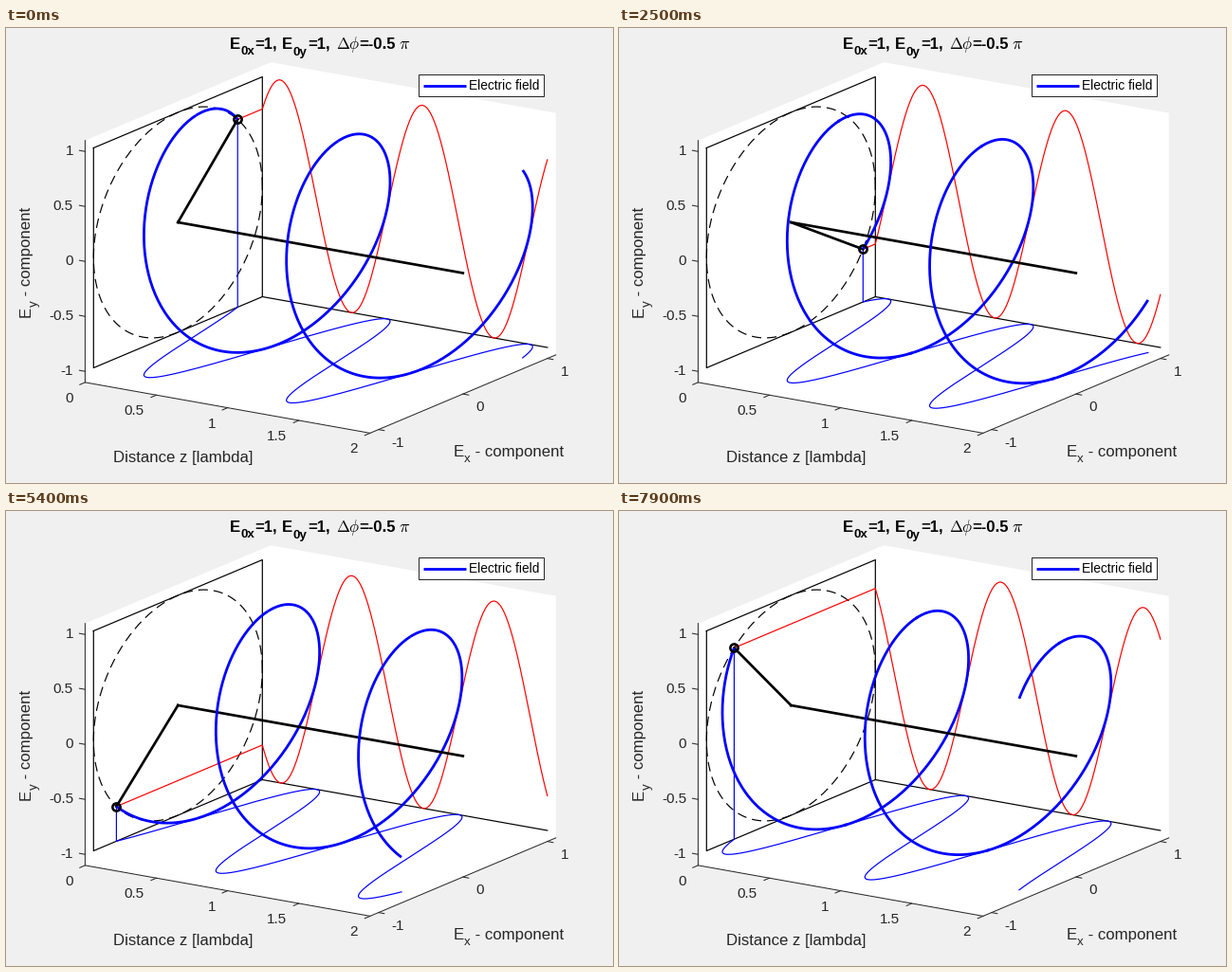
Write a matplotlib script that moves like this. It is 640 by 480 pixels and loops after 8000 ms.

```python
import numpy as np
import matplotlib.pyplot as plt
from matplotlib.animation import FuncAnimation
from matplotlib.patches import Polygon, Rectangle

W, H, DPI = 640, 480, 100
FRAMES, INTERVAL, HOLD = 80, 100, 4
PX = 72 / DPI                      # points per pixel
GREY = "#262626"
TICK, LABEL, SUB, SMALL = 15.3, 16.8, 13.4, 13.8
LIM = 1.1

plt.rcParams["font.family"] = "Liberation Sans"
plt.rcParams["mathtext.fontset"] = "cm"

fig = plt.figure(figsize=(W / DPI, H / DPI), dpi=DPI, facecolor="#f0f0f0")
ax = fig.add_axes([0, 0, 1, 1])
ax.set_xlim(0, W)
ax.set_ylim(H, 0)
ax.axis("off")


def project(x, y, z):
    """Parallel projection of field components x, y at distance z."""
    x, y, z = np.broadcast_arrays(*(np.asarray(v, float) for v in (x, y, z)))
    return (181.3 + 150.25 * z + 89 * x,
            205 + 26.75 * z - 37.5 * x - 116 * y)


def line(x, y, z, color, width, order, **kw):
    return ax.plot(*project(x, y, z), color=color, lw=width * PX,
                   zorder=order, **kw)[0]


def label(x, y, s, size=TICK, color=GREY, **kw):
    ax.text(x, y, s, size=size * PX, color=color, va="baseline",
            rotation_mode="anchor", zorder=21, **kw)


def tick(x, y, z, dx, dy):
    px, py = project(x, y, z)
    ax.plot([px, px + dx], [py, py + dy], color=GREY, lw=PX, zorder=2)


def draw_box():
    a = LIM
    outline = project([-a, a, a, a, -a, -a], [a, a, a, -a, -a, -a],
                      [0, 0, 2, 2, 2, 0])
    ax.add_patch(Polygon(np.column_stack(outline), fc="white", ec="none",
                         zorder=1))
    line([-a, -a, -a, a], [a, -a, -a, -a], [0, 0, 2, 2], GREY, 1, 2)

    for i, v in enumerate([1, 0.5, 0, -0.5, -1]):
        tick(-a, v, 0, -6, -1.1)
        label(71, 133.7 + 58.1 * i, f"{v:g}", ha="right")
    for i, v in enumerate([0, 0.5, 1, 1.5, 2]):
        tick(-a, -a, v, -5.6, 2.4)
        label(70.7 + 75.1 * i, 394.7 + 13.4 * i, f"{v:g}", ha="right")
    for i, v in enumerate([-1, 0, 1]):
        tick(v, -a, 2, 6, 1.1)
        label(406.8 + 89 * i, 441.7 - 37.5 * i, f"{v:g}")

    # reference square, circle and floor line
    line([-1, 1, 1, -1, -1], [1, 1, -1, -1, 1], 0, "black", 1.2, 3)
    t = np.linspace(0, 2 * np.pi, 200)
    line(np.cos(t), np.sin(t), 0, "black", 1.2, 3, dashes=(8.4, 5),
         dash_capstyle="butt")
    line(1, -1, [0, 2], "black", 1.2, 3)
    line(0, 0, [0, 2], "black", 2.7, 8)


def draw_text():
    label(113, 458.3, "Distance z [lambda]", LABEL)
    label(472, 451.8, "E", LABEL)
    label(483.3, 458.5, "x", SUB)
    label(490.2, 451.8, " - component", LABEL)
    label(26, 305, "E", LABEL, rotation=90)
    label(32.5, 293.7, "y", SUB, rotation=90)
    label(26, 286.8, " - component", LABEL, rotation=90)

    bold = dict(color="black", weight="bold")
    for x, name in ((236, "0x"), (291.3, "0y")):
        label(x, 21.5, "E", LABEL, **bold)
        label(x + 11.6, 28.5, name, SUB, **bold)
        label(x + 26.6, 21.5, "=1,", LABEL, **bold)
    label(348, 21.5, r"$\Delta\phi$", LABEL, "black")
    label(371.8, 21.5, "=-0.5", LABEL, **bold)
    label(413.5, 21.5, r"$\pi$", LABEL + 1, "black")


def draw_legend():
    ax.add_patch(Rectangle((434.5, 48.5), 132, 23, fc="white", ec=GREY,
                           lw=PX, zorder=20))
    ax.plot([439.5, 485], [60.5, 60.5], color="blue", lw=2.8 * PX, zorder=21,
            solid_capstyle="butt")
    label(488, 65.3, "Electric field", SMALL, "black")


draw_box()
draw_text()
draw_legend()

z = np.linspace(0, 2, 401)
floor = line(0, -1, z, "blue", 1.2, 4)
wall = line(1, 0, z, "red", 1.2, 5)
radius = line(0, 0, [0, 0], "black", 2.7, 6)
far = line(0, 0, z, "blue", 2.8, 7, solid_capstyle="butt")
near = line(0, 0, z, "blue", 2.8, 9, solid_capstyle="butt")
dot = line(0, 0, [0], "black", 1, 10, marker="o", ms=8.2 * PX, mfc="none",
           mew=2.6 * PX)


def update(i):
    step = max(0, i - HOLD)
    angle = 2 * np.pi * (z - step / 99) + np.pi / 4
    x, y = np.cos(angle), np.sin(angle)
    x0, y0 = x[0], y[0]

    # the central axis hides the half of the helix behind it
    far.set_data(*project(np.where(x > -0.03, x, np.nan), y, z))
    near.set_data(*project(np.where(x < 0.03, x, np.nan), y, z))
    floor.set_data(*project(np.r_[x0, x], np.r_[y0, -np.ones_like(x)],
                            np.r_[0, z]))
    wall.set_data(*project(np.r_[x0, np.ones_like(x)], np.r_[y0, y],
                           np.r_[0, z]))
    radius.set_data(*project([0, x0], [0, y0], 0))
    dot.set_data(*project([x0], [y0], 0))
    return floor, wall, radius, far, near, dot


anim = FuncAnimation(fig, update, frames=FRAMES, interval=INTERVAL,
                     repeat=True, repeat_delay=0, blit=False)
plt.show()
```
